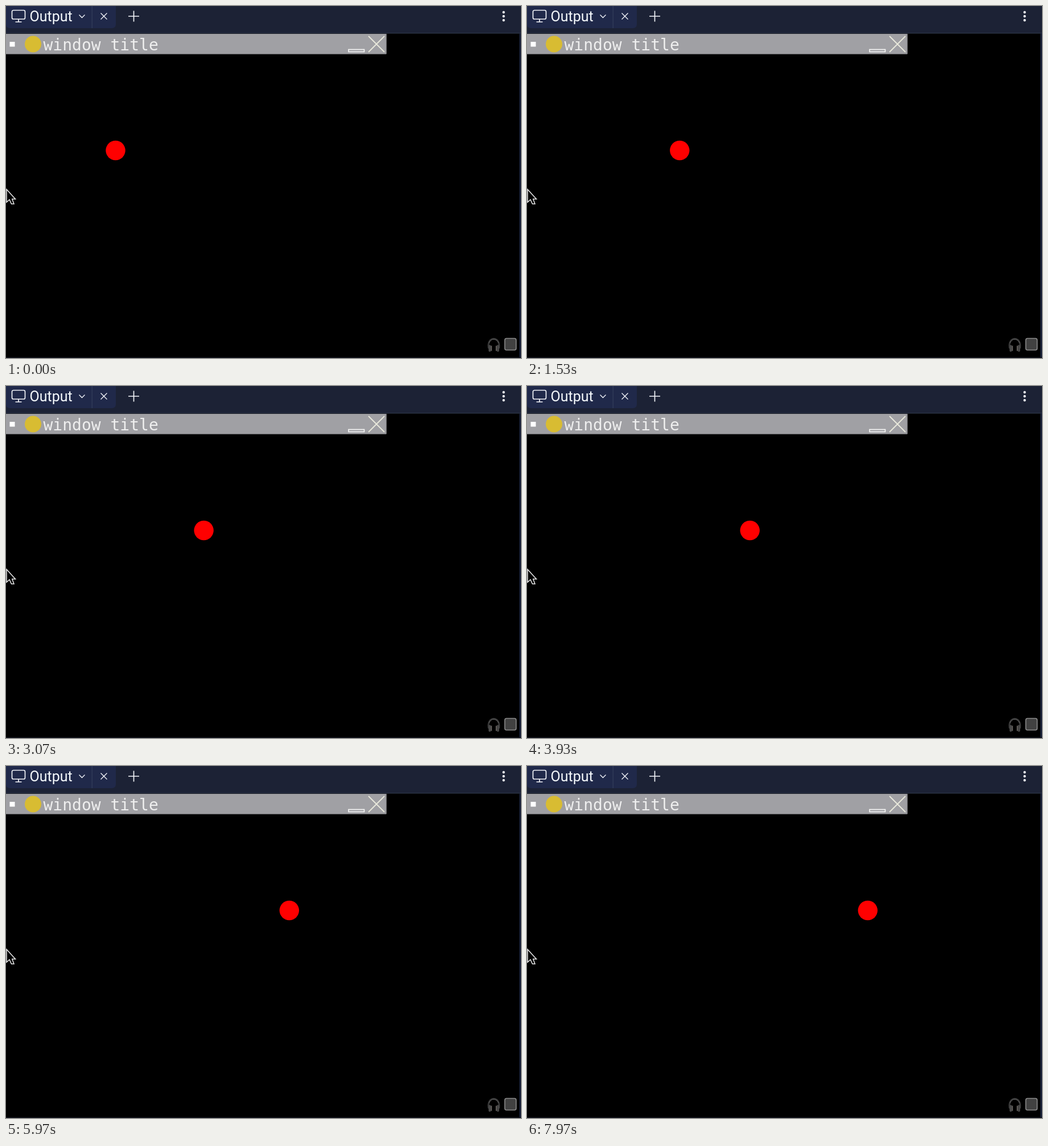
Recreate the animation shown at these times as an HTML page. Size 905 by 619 pixels, loop 8 s.

```html
<!DOCTYPE html>
<html lang="en">
<head>
<meta charset="utf-8">
<title>Output</title>
<style>
  html, body { margin: 0; width: 100%; height: 100%; overflow: hidden; background: #000; }
  svg { display: block; width: 905px; height: 619px; }
  .line { fill: none; stroke: #f3f5fa; stroke-width: 1.7; }
  .tab { font: 25px Roboto, sans-serif; fill: #f5f9fc; }
  .caption { font: 28px "DejaVu Sans Mono", monospace; fill: #efefef; }
</style>
</head>
<body>
<svg viewBox="0 0 905 619">
  <rect width="905" height="619" fill="#000"/>

  <!-- Tab strip -->
  <rect width="905" height="48" fill="#1c2235"/>
  <rect y="47" width="905" height="1.5" fill="#2b3245"/>
  <path d="M0 0H193V32Q193 39 186 39H7Q0 39 0 32Z" fill="#20294a"/>
  <rect x="150.5" width="1.5" height="39" fill="#303a58"/>
  <g class="line">
    <rect x="10.5" y="7.5" width="23" height="15.5" rx="2.5"/>
    <path d="M22 23V28M16.5 28H27.5"/>
    <path d="M128.5 15.5L133.5 20.5L138.5 15.5" stroke-width="1.4"/>
    <path d="M166.5 12.5L177.5 23.5M177.5 12.5L166.5 23.5" stroke-width="1.4"/>
    <path d="M224.5 8.5V27.5M215 18H234"/>
  </g>
  <g fill="#f3f5fa">
    <circle cx="874.5" cy="11" r="2.2"/>
    <circle cx="874.5" cy="18" r="2.2"/>
    <circle cx="874.5" cy="25" r="2.2"/>
  </g>
  <text class="tab" x="41.5" y="26.5">Output</text>

  <!-- Window title bar -->
  <rect y="49" width="668.5" height="35.5" fill="#a0a0a4"/>
  <path d="M0 84H668V49" fill="none" stroke="#8c8c90"/>
  <rect x="6.5" y="63" width="9" height="8.5" fill="#fff"/>
  <circle cx="47.5" cy="67" r="14.5" fill="#d8bc32"/>
  <text class="caption" x="65.5" y="77.5">window title</text>
  <rect x="602" y="76.5" width="27.5" height="4" fill="#a0a0a4" stroke="#f4f4f4" stroke-width="1.7"/>
  <path d="M637 53L665 81M665 53L637 81" fill="none" stroke="#e9e9dc" stroke-width="1.8"/>

  <circle id="ball" cy="254" r="17.2" fill="#f00"/>

  <path d="M1 322.5V345L6 340.5L9.5 348H14L10.8 339.5H16.5Z" fill="#000" stroke="#e8e8e8" stroke-width="1.5"/>

  <!-- Corner controls -->
  <g fill="none" stroke-linecap="round">
    <path d="M848 601C845 580 869 580 866.5 601" stroke="#363636" stroke-width="3"/>
    <path d="M849 592C852 584 862 584 865.5 592" stroke="#666" stroke-width="1"/>
    <path d="M850 598V606M864.5 598V606" stroke="#494949" stroke-width="4"/>
    <path d="M853 598V606M861.5 598V606" stroke="#8a8580" stroke-width="1.3"/>
  </g>
  <rect x="876.5" y="584.5" width="20" height="20.5" rx="3" fill="#414141" stroke="#8c8c8c" stroke-width="1.6"/>

  <!-- Pane edges -->
  <rect x="902" y="48" width="3" height="571" fill="#171e35"/>
  <rect y="617.5" width="905" height="1.5" fill="#10131c"/>
</svg>
<script>
  const LOOP = 8000;
  const TICK = 100 / 3;
  const path = [[0, 192.5], [830, 231], [2170, 302], [3930, 391.5],
                [5130, 452], [5970, 498], [7970, 599]];
  const ball = document.getElementById("ball");

  function ballX(time) {
    const next = path.findIndex(([t]) => t >= time);
    if (next === 0) return path[0][1];
    if (next < 0) return path[path.length - 1][1];
    const [t0, x0] = path[next - 1];
    const [t1, x1] = path[next];
    return x0 + (x1 - x0) * (time - t0) / (t1 - t0);
  }

  const start = performance.now();
  function draw(now) {
    const time = Math.max(0, now - start) % LOOP;
    const step = Math.min(239, Math.floor((time + 4) / TICK));
    ball.setAttribute("cx", ballX(step * TICK).toFixed(1));
    requestAnimationFrame(draw);
  }
  draw(start);
</script>
</body>
</html>
```
